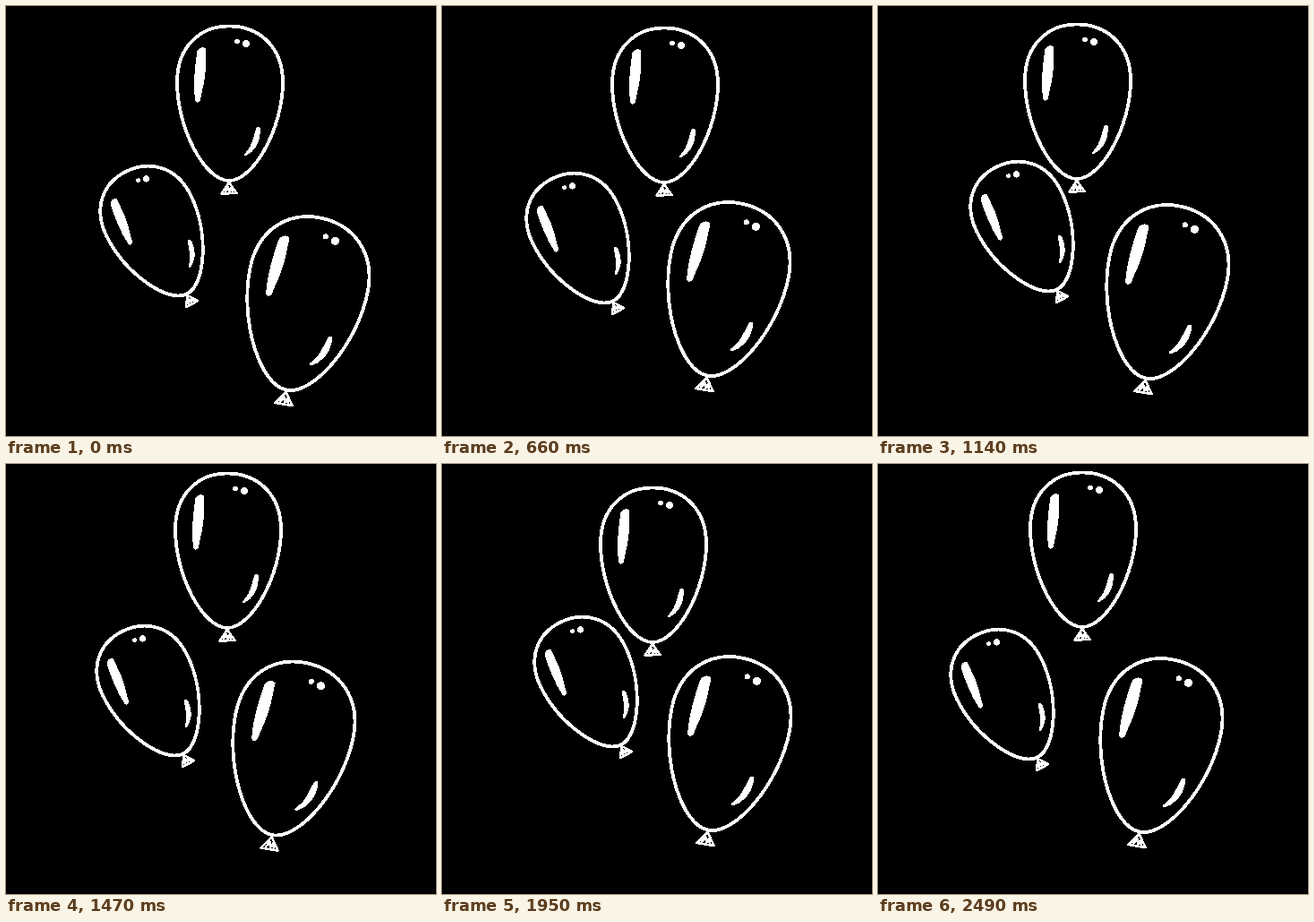
An HTML page that plays this animation: 480 by 480 pixels, repeating every 2.52 s.

```html
<!DOCTYPE html>
<html lang="en">
<head>
<meta charset="utf-8">
<title>Balloons</title>
<style>
  html, body { margin: 0; width: 100%; height: 100%; overflow: hidden; background: #000; }
  svg { display: block; width: 100vw; height: 100vh; shape-rendering: crispEdges; }
  .line { fill: none; stroke: #fff; stroke-width: 3.8; stroke-linejoin: round; stroke-linecap: round; vector-effect: non-scaling-stroke; }
  .thin { stroke-width: 2.5; }
  .shine { fill: #fff; }
</style>
</head>
<body>
<svg viewBox="0 0 480 480">
  <defs>
    <!-- The big dot of the highlight is the origin -->
    <g id="balloon" transform="translate(-268 -42)">
      <path class="line" d="M249 195C222 195 191 137 191 85C191 46 216 22.5 249 22.5C283 22.5 309 46 309 85C309 137 276 195 249 195Z"/>
      <path class="shine" d="M213.5 50Q218 44 223.5 47.5L223 70C222 85 218.5 95 217 105Q214 110 211 106L210 92C210 72 212 60 213.5 50Z"/>
      <path class="shine" d="M279.5 136Q284 132 284 140C284 152 277 163 268 167Q264 167 268 163C275 156 276 146 279.5 136Z"/>
      <circle class="shine" cx="258" cy="39.5" r="2.7"/>
      <circle class="shine" cx="268" cy="42" r="4.1"/>
      <path class="line thin" d="M249 197L240.5 209.5L257.5 209ZM245 207.5L248 202L249.5 207.5L251.5 203L253 207.5"/>
    </g>
  </defs>
  <g class="float"><use href="#balloon" transform="translate(268 42)"/></g>
  <g class="float"><use href="#balloon" transform="translate(156.5 192.8) rotate(-26.5) scale(.885)"/></g>
  <g class="float"><use href="#balloon" transform="translate(367.4 262.3) rotate(11) scale(1.135)"/></g>
</svg>
<script>
const LOOP = 2520, STEP = 30;
const times = [0, 360, 660, 1140, 1470, 1950, 2490];

// Points each balloon drifts through, and how far it bows out between them
const balloons = [
  { bow: [0, 3], path: [[0, 0], [-8, 8], [-1, 2], [-27, -2], [-2, -12], [-14, 4], [-21, -13]] },
  { bow: [-4, 0], path: [[0, 0], [-8.5, 7], [-11, 8], [-2, -5], [-4, 2], [-2, -8], [-24, 6]] },
  { bow: [6, 8], path: [[0, 0], [-9, -8], [-17, -16], [-14, -13], [-16, -14.5], [-16, -20], [-21, -18]] }
];

const groups = document.querySelectorAll('.float');
const start = performance.now();

function draw(now) {
  const t = Math.floor((Math.max(0, now - start) % LOOP) / STEP) * STEP;
  const next = Math.max(1, times.findIndex(time => time >= t));
  const u = (t - times[next - 1]) / (times[next] - times[next - 1]);
  const ease = (1 - Math.cos(Math.PI * u)) / 2;
  const swell = Math.sin(Math.PI * u) ** 2;

  balloons.forEach(({ bow, path }, i) => {
    const from = path[next - 1], to = path[next];
    const [x, y] = from.map((p, k) => p + (to[k] - p) * ease + bow[k] * swell);
    groups[i].setAttribute('transform', `translate(${x.toFixed(2)} ${y.toFixed(2)})`);
  });
  requestAnimationFrame(draw);
}
draw(start);
</script>
</body>
</html>
```
